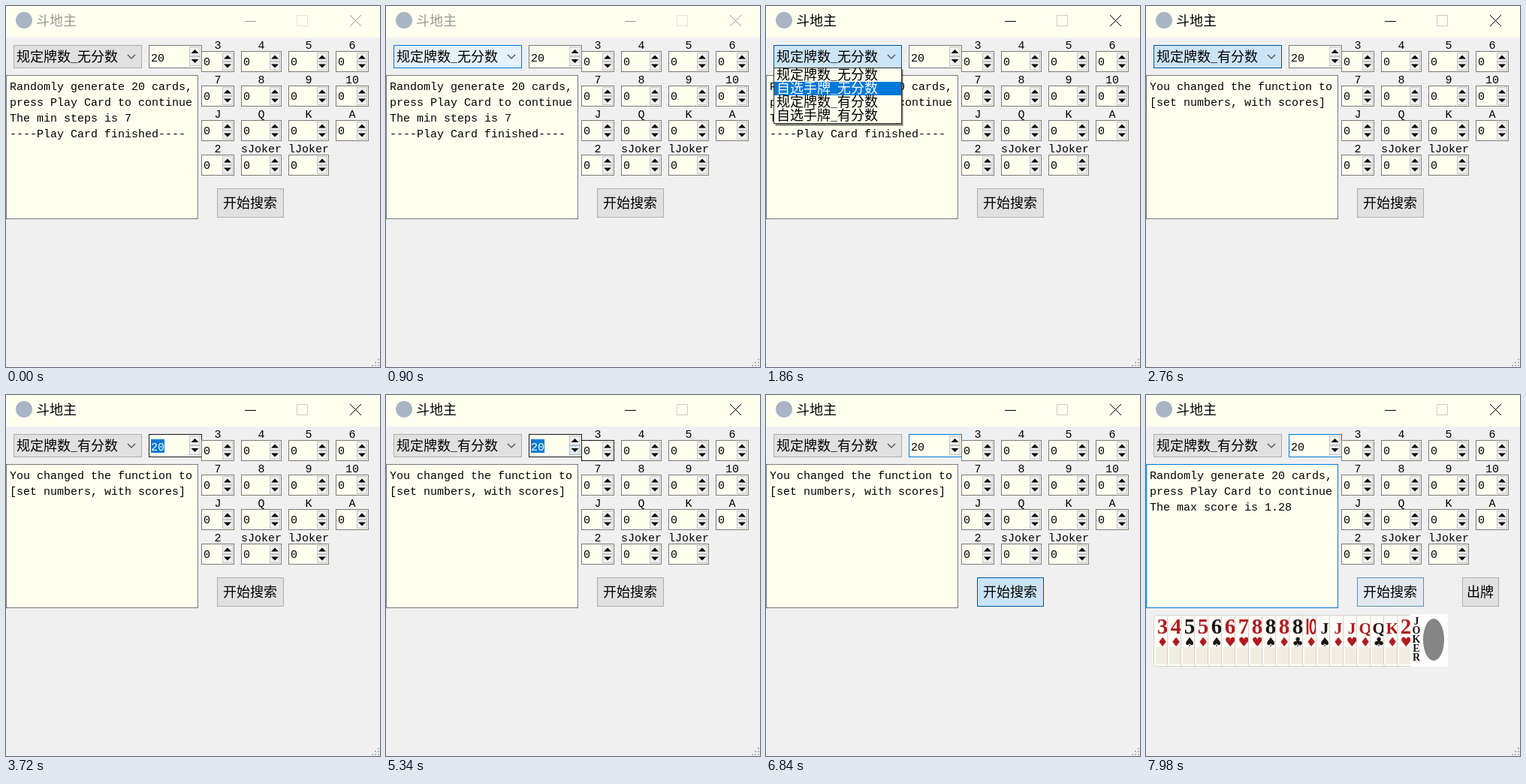
Recreate the animation shown at these times as an HTML page with a canvas. Size 498x481 px, loop 8000 ms.

```html
<!DOCTYPE html>
<html lang="zh-CN">
<head>
<meta charset="utf-8">
<title>斗地主</title>
<style>
html, body { margin: 0; width: 100%; height: 100%; overflow: hidden; background: #f0f0f1; }
canvas { display: block; }
</style>
</head>
<body>
<canvas id="stage" width="498" height="481"></canvas>
<script>
const ctx = document.getElementById('stage').getContext('2d');
const LOOP = 8000, STEP = 60;
const IVORY = '#fffff0', GREY = '#7a7a7a', DARK = '#171717', BLUE = '#0078d7';
const MONO = '15px "Liberation Mono", monospace';
const HAN = '18px "Noto Sans CJK SC", "Noto Sans CJK", sans-serif';
const FACE = {
  normal: ['#e1e1e1', '#adadad'],
  hover: ['#e5f1fb', '#0078d7'],
  pressed: ['#cce4f7', '#005499']
};
const MODES = ['规定牌数_无分数', '自选手牌_无分数', '规定牌数_有分数', '自选手牌_有分数'];
const COLS = [[260, 44], [313, 54], [376, 54], [439, 44]];
const LABELS = ['3', '4', '5', '6', '7', '8', '9', '10', 'J', 'Q', 'K', 'A', '2', 'sJoker', 'lJoker'];
// pointer visits to the count boxes: box, enter, leave
const VISITS = [
  [3, 180, 300], [2, 300, 480], [1, 480, 600], [0, 600, 700],
  [0, 5220, 5440], [1, 5440, 5560], [2, 5560, 5680], [3, 5680, 5800],
  [7, 5800, 5980], [6, 5980, 6120], [5, 6120, 6240], [9, 6240, 6360], [13, 6360, 6500]
];
const HAND = '3♦ 4♦ 5♠ 5♦ 6♠ 6♥ 7♥ 8♥ 8♠ 8♦ 8♣ 10♦ J♠ J♦ J♥ Q♦ Q♣ K♦ 2♥'.split(' ');

const clamp = v => Math.max(0, Math.min(1, v));
const ramp = (t, start, len) => clamp((t - start) / len);
const glow = (t, on, off, len = 100) => ramp(t, on, len) * (1 - ramp(t, off, len));

function mix(a, b, k) {
  const part = (s, i) => parseInt(s.slice(i, i + 2), 16);
  return '#' + [1, 3, 5].map(i =>
    Math.round(part(a, i) + (part(b, i) - part(a, i)) * k).toString(16).padStart(2, '0')).join('');
}
const mixFace = (a, b, k) => [mix(a[0], b[0], k), mix(a[1], b[1], k)];

function fill(x, y, w, h, color) {
  ctx.fillStyle = color;
  ctx.fillRect(x, y, w, h);
}

function box(x, y, w, h, back, edge) {
  fill(x, y, w, h, edge);
  fill(x + 1, y + 1, w - 2, h - 2, back);
}

function path(points, color, width = 1) {
  ctx.strokeStyle = color;
  ctx.lineWidth = width;
  ctx.beginPath();
  points.forEach(([x, y]) => ctx.lineTo(x, y));
  ctx.stroke();
}

// half-width and full-width runs on a 9 px grid
function text(str, x, y, color = '#000000', weight = 300) {
  ctx.fillStyle = color;
  ctx.textAlign = 'left';
  for (const run of str.match(/[\x20-\x7e]+|[^\x20-\x7e]+/g)) {
    const latin = run.charCodeAt(0) < 127;
    ctx.font = latin ? MONO : weight + ' ' + HAN;
    ctx.fillText(run, x, y);
    x += run.length * (latin ? 9 : 18);
  }
}

function arrow(x, y, w, h, dir, heat = 0) {
  box(x, y, w, h, mix('#f0f0f0', '#cce4f7', heat), mix('#c4c4c4', '#7eb4ea', heat));
  const cx = x + w / 2, cy = y + h / 2;
  ctx.fillStyle = '#000000';
  ctx.beginPath();
  ctx.moveTo(cx - 5, cy - 2.5 * dir);
  ctx.lineTo(cx + 5, cy - 2.5 * dir);
  ctx.lineTo(cx, cy + 2.5 * dir);
  ctx.fill();
}

function titleBar(t) {
  const active = t >= 1080;
  const ink = active ? '#000000' : '#999994';
  fill(0, 0, 498, 42, IVORY);
  ctx.fillStyle = '#a9b4c4';
  ctx.beginPath();
  ctx.arc(24, 19, 11, 0, 7);
  ctx.fill();
  text('斗地主', 40, 26, ink, 400);
  path([[318, 20.5], [333, 20.5]], ink);
  ctx.strokeStyle = active ? '#ccccc4' : '#e4e4d8';
  ctx.strokeRect(387.5, 12.5, 14, 14);
  path([[458, 12], [473, 27]], ink);
  path([[473, 12], [458, 27]], ink);
}

function combo(t) {
  let face;
  if (t < 1080) face = mixFace(FACE.normal, FACE.hover, ramp(t, 740, 140));
  else if (t < 2820) face = mixFace(FACE.hover, FACE.pressed, ramp(t, 1020, 240));
  else if (t < 3000) face = mixFace(FACE.pressed, FACE.hover, ramp(t, 2760, 180));
  else face = mixFace(FACE.hover, FACE.normal, ramp(t, 3000, 300));
  box(10, 52, 171, 31, ...face);
  text(MODES[t < 2760 ? 0 : 2], 14, 74);
  path([[162, 65], [167, 70], [172, 65]], '#444444', 1.2);
}

function popup(t) {
  if (t < 1080 || t >= 2760) return;
  const h = Math.round(75 * ramp(t, 1020, 240));
  const pick = t < 1800 ? 0 : t < 2040 ? 1 : 2;
  fill(13, 85, 170, h, 'rgba(0,0,0,0.25)');
  fill(12, 84, 170, h, 'rgba(0,0,0,0.35)');
  ctx.save();
  ctx.beginPath();
  ctx.rect(10, 82, 171, h);
  ctx.clip();
  ctx.translate(0, h - 75);
  box(10, 82, 171, 75, IVORY, '#333333');
  MODES.forEach((name, i) => {
    const y = 83 + 18 * i;
    if (i === pick) fill(11, y, 169, 18, BLUE);
    text(name, 14, y + 15, i === pick ? '#ffffff' : '#000000');
  });
  ctx.restore();
}

function totalBox(t) {
  const hover = Math.max(glow(t, 690, 780, 60), glow(t, 3240, 5360, 180));
  const base = mix(GREY, BLUE, ramp(t, 3420, 180));
  const picked = (t >= 3660 && t < 4140) || (t >= 4500 && t < 6480);
  box(190, 52, 71, 31, IVORY, mix(base, DARK, hover));
  if (picked) fill(193, 59, 18, 18, BLUE);
  text(t >= 4500 && t < 4800 ? '21' : '20', 193, 74, picked ? '#ffffff' : '#000000');
  arrow(244, 54, 15, 13, -1, glow(t, 4440, 4800, 120));
  arrow(244, 67, 15, 13, 1, glow(t, 4740, 5240, 200));
}

function countBoxes(t) {
  LABELS.forEach((label, i) => {
    const [x, w] = COLS[i % 4];
    const y = 60 + 46 * Math.floor(i / 4);
    const heat = VISITS.reduce((m, [id, on, off]) => id === i ? Math.max(m, glow(t, on, off, 60)) : m, 0);
    text(label, x + w / 2 - label.length * 4.5, y - 3);
    box(x, y, w, 28, IVORY, mix(GREY, DARK, heat));
    text('0', x + 3, y + 19);
    arrow(x + w - 16, y + 2, 14, 12, -1);
    arrow(x + w - 16, y + 14, 14, 12, 1);
  });
}

function logBox(t) {
  box(0, 92, 256, 192, IVORY, mix(GREY, BLUE, ramp(t, 7500, 180)));
  const opening = ['Randomly generate 20 cards,', 'press Play Card to continue'];
  const lines = t < 2760 ? [...opening, 'The min steps is 7', '----Play Card finished----']
    : t < 7500 ? ['You changed the function to', '[set numbers, with scores]']
    : [...opening, 'The max score is 1.28'];
  lines.forEach((line, i) => text(line, 5, 112 + 21 * i));
}

function buttons(t) {
  let face;
  if (t < 6840) face = mixFace(FACE.normal, FACE.hover, ramp(t, 6500, 200));
  else if (t < 7500) face = FACE.pressed;
  else if (t < 7900) face = mixFace(FACE.pressed, FACE.hover, ramp(t, 7440, 180));
  else face = mixFace(FACE.hover, FACE.normal, ramp(t, 7860, 240));
  box(281, 243, 89, 39, ...face);
  text('开始搜索', 289, 269);
  if (t >= 7500) {
    box(421, 243, 49, 39, ...FACE.normal);
    text('出牌', 427, 269);
  }
}

function card(x, w) {
  ctx.beginPath();
  ctx.roundRect(x + 0.5, 293.5, w, 68, 3);
  ctx.fillStyle = '#fffdf8';
  ctx.fill();
  ctx.strokeStyle = '#d6d1c8';
  ctx.lineWidth = 1;
  ctx.stroke();
}

function hand() {
  HAND.forEach((name, i) => {
    const x = 10 + 18 * i, cx = x + 12;
    const suit = name.slice(-1), rank = name.slice(0, -1);
    const ink = '♦♥'.includes(suit) ? '#b01c20' : '#1c1616';
    card(x, 48);
    fill(x + 3, 336, 44, 23, '#f1ede1');
    ctx.fillStyle = ink;
    ctx.textAlign = 'center';
    if (rank === '10') {
      path([[cx - 5, 298], [cx - 5, 319]], ink, 2.6);
      ctx.beginPath();
      ctx.ellipse(cx + 2.5, 308.5, 3.6, 9.3, 0, 0, 7);
      ctx.stroke();
    } else {
      ctx.font = (/[JQK]/.test(rank) ? 'bold 22px' : 'bold 29px') + ' "Liberation Serif", serif';
      ctx.fillText(rank, cx, 318);
    }
    ctx.font = '17px "DejaVu Sans", sans-serif';
    ctx.fillText(suit, cx, 335);
  });
  fill(352, 292, 50, 70, '#fffdfd');
  ctx.fillStyle = '#1c1616';
  ctx.font = 'bold 14px "Liberation Serif", serif';
  [...'JOKER'].forEach((c, i) => ctx.fillText(c, 360, 306 + 12 * i));
  ctx.fillStyle = '#858585';
  ctx.beginPath();
  ctx.ellipse(383, 326, 14, 28, 0, 0, 7);
  ctx.fill();
}

function grip() {
  for (let r = 0; r < 3; r++)
    for (let c = 2 - r; c < 3; c++) fill(487 + 4 * c, 470 + 4 * r, 2, 2, '#b4b4b4');
}

function draw(t) {
  fill(0, 0, 498, 481, '#f0f0f1');
  titleBar(t);
  combo(t);
  totalBox(t);
  countBoxes(t);
  logBox(t);
  buttons(t);
  if (t >= 7500) hand();
  popup(t);
  grip();
}

let origin;
function tick(now) {
  origin ??= now;
  const t = (now - origin) % LOOP;
  draw(Math.floor(t / STEP) * STEP);
  requestAnimationFrame(tick);
}
draw(0);
requestAnimationFrame(tick);
</script>
</body>
</html>
```
